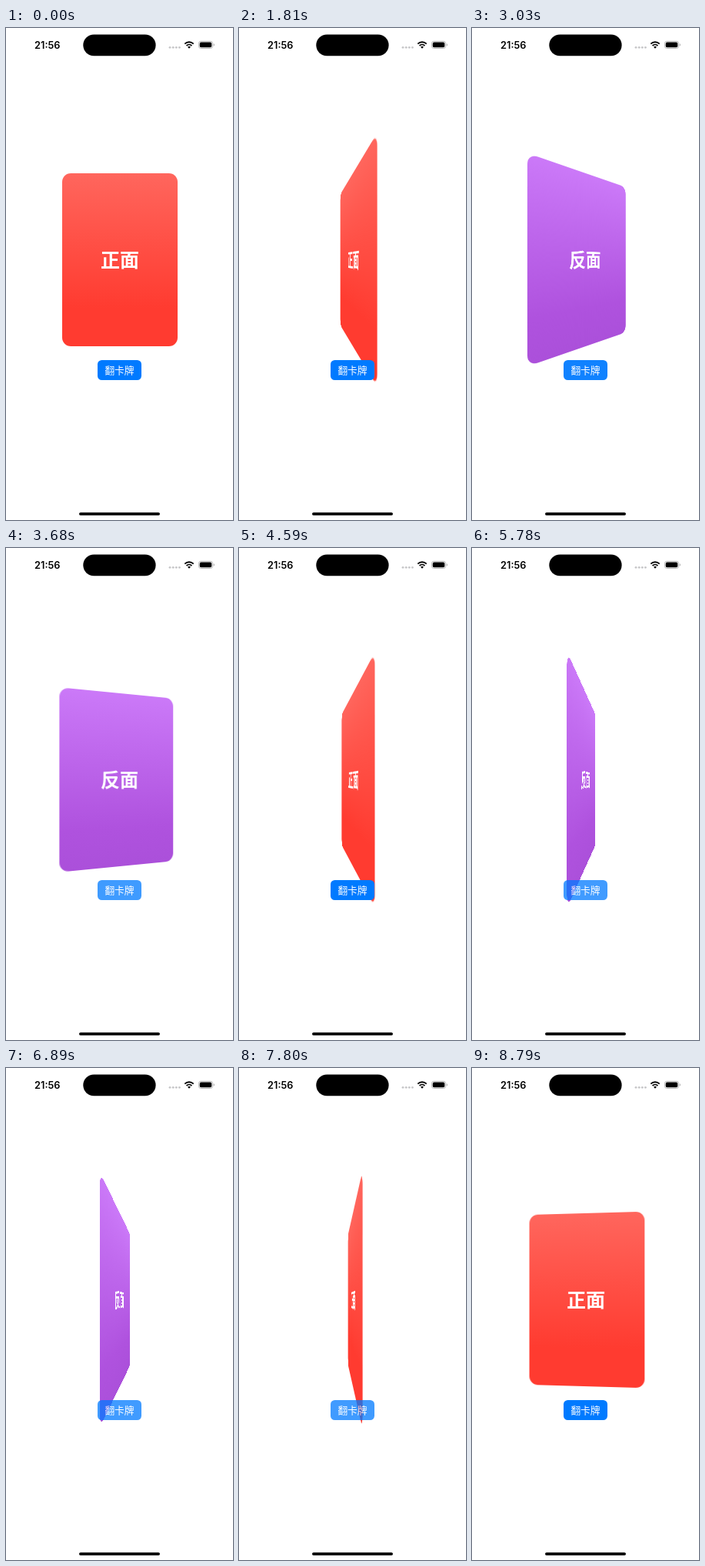
An HTML page that plays this animation: 295x640 px, repeating every 8.9 s.

```html
<!DOCTYPE html>
<html lang="zh">
<head>
<meta charset="utf-8">
<title>翻卡牌</title>
<style>
  html, body { margin: 0; width: 100%; height: 100%; overflow: hidden; background: #fff; }
  #stage { position: relative; width: 295px; height: 640px; overflow: hidden; background: #fff; }
  #stage > * { position: absolute; }
  svg { left: 0; top: 0; }
  .face, #button {
    color: #fff; text-align: center; white-space: nowrap;
    font-family: "Noto Sans CJK SC", "Noto Sans CJK", sans-serif;
  }
  .face {
    left: 72.5px; top: 189px; width: 150px; height: 225px;
    border-radius: 11.25px; font-size: 25px; font-weight: 700; line-height: 223px;
  }
  #front { background: linear-gradient(#ff665d, #ff3b30 78%); }
  #back { background: linear-gradient(#cb79f8, #af52de 78%, #ab50da); }
  #button {
    left: 119px; top: 432px; width: 57px; height: 26px;
    border-radius: 5.5px; background: #007aff; font-size: 12.75px; line-height: 26px;
  }
</style>
</head>
<body>
<div id="stage">
  <svg width="295" height="640" viewBox="0 0 295 640">
    <text x="53.8" y="26.6" text-anchor="middle" font-family="Inter, sans-serif" font-size="12.75" font-weight="600">21:56</text>
    <rect x="100.3" y="8.4" width="94.3" height="27.8" rx="13.9"/>
    <g fill="#c6c6c8">
      <circle cx="213" cy="25.3" r="1.4"/><circle cx="217.2" cy="25.3" r="1.4"/>
      <circle cx="221.3" cy="25.3" r="1.4"/><circle cx="225.4" cy="25.3" r="1.4"/>
    </g>
    <g fill="none" stroke="#000" stroke-width="1.8">
      <path d="M232.3 20.6a8.1 8.1 0 0 1 11.4 0"/>
      <path d="M234.6 23a4.9 4.9 0 0 1 6.8 0"/>
    </g>
    <path d="M238 26.8l-1.9-2a2.7 2.7 0 0 1 3.8 0z"/>
    <rect x="250.4" y="17.3" width="18.2" height="9.2" rx="2.9" fill="none" stroke="#a8a8a8" stroke-width=".8"/>
    <rect x="251.7" y="18.6" width="15.6" height="6.6" rx="1.8"/>
    <path d="M269.8 20.3v3.2a1.7 1.7 0 0 0 0-3.2z" fill="#a8a8a8"/>
    <rect x="95" y="630.2" width="105" height="3.8" rx="1.9"/>
  </svg>
  <div id="front" class="face">正面</div>
  <div id="back" class="face">反面</div>
  <div id="button">翻卡牌</div>
</div>
<script>
  const LOOP = 8900, START = 1380, STEP = 110.3, LEAD = 18;
  const OMEGA = 2 * Math.PI / 500;   // critically damped spring, per ms
  const HOLD = 70, FADE = 80;        // button press and release

  const [front, back, button] = ['front', 'back', 'button'].map(id => document.getElementById(id));

  // Slow taps first, then two runs of rapid ones.
  const taps = [1710, 2130, 2550, 2974, 3340, 3700, 4064, 4426, 4790, 5000];
  for (let i = 0; i <= 12; i++) taps.push(5159 + i * 129.5);
  for (let i = 1; i <= 13; i++) taps.push(6713 + i * 123.6);

  // Each tap swaps the spring's goal and keeps its velocity.
  function angleAt(t) {
    let pos = 0, vel = 0, goal = 0;
    for (let i = 0; i < taps.length && taps[i] < t; i++) {
      goal = 180 - goal;
      const dt = Math.min(t, taps[i + 1] ?? Infinity) - taps[i];
      const off = pos - goal;
      const push = vel + OMEGA * off;
      const decay = Math.exp(-OMEGA * dt);
      const rest = (off + push * dt) * decay;
      pos = goal + rest;
      vel = push * decay - OMEGA * rest;
    }
    return pos;
  }

  function pressAt(t) {
    return Math.max(0, ...taps.map(tap => {
      const d = t - tap;
      return d < -HOLD ? 0 : d < 0 ? 1 : 1 - d / FADE;
    }));
  }

  function turn(face, angle, shown) {
    face.style.visibility = shown ? 'visible' : 'hidden';
    face.style.transform = `perspective(225px) rotateY(${angle}deg)`;
  }

  function draw(t) {
    const angle = angleAt(t);
    turn(front, -angle, angle < 90);
    turn(back, 180 - angle, angle >= 90);
    button.style.opacity = 1 - 0.25 * pressAt(t);
  }

  const snap = t => START + Math.floor((t - START + LEAD) / STEP) * STEP;

  const origin = performance.now();
  function tick() {
    draw(snap((performance.now() - origin) % LOOP));
    requestAnimationFrame(tick);
  }
  tick();
</script>
</body>
</html>
```
